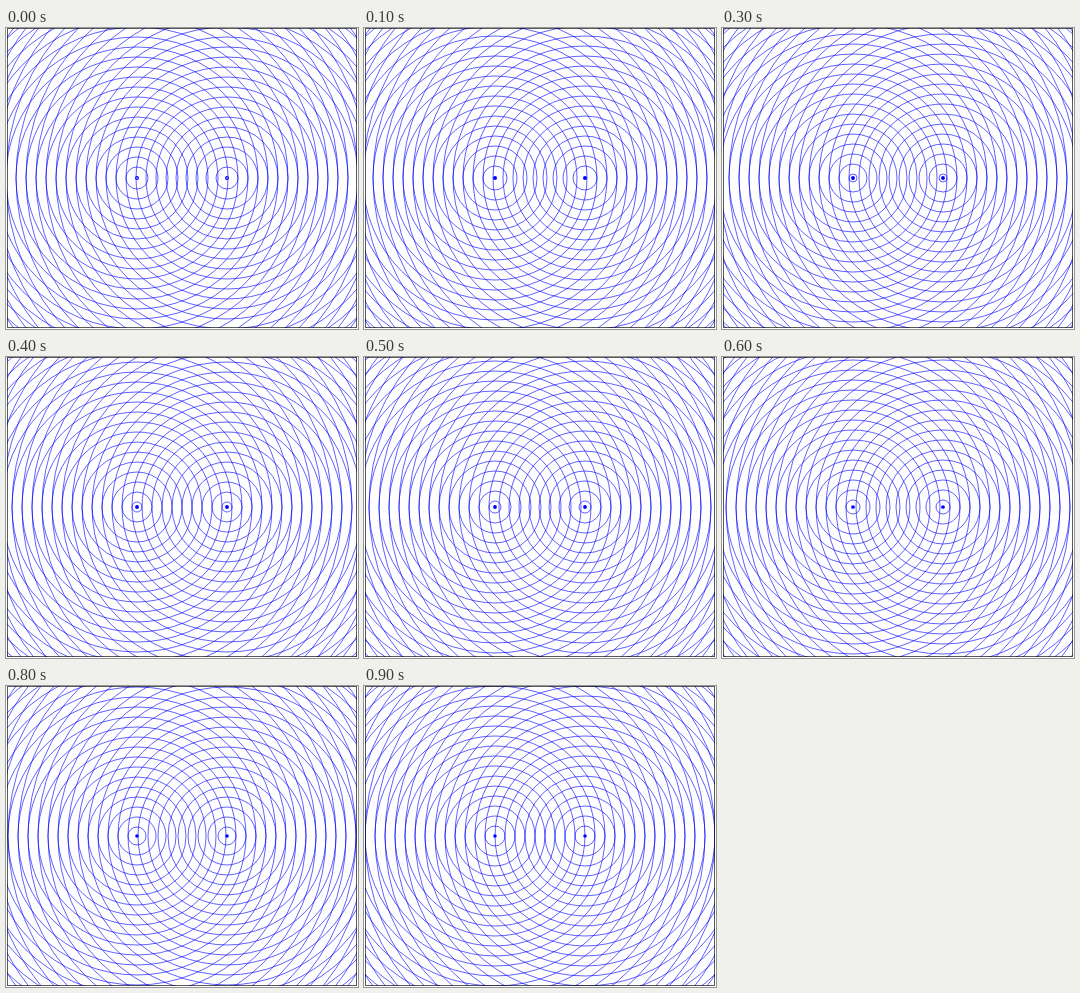
Write an HTML page that moves like this. It is 352x301 px and loops after 1 s.

```html
<!DOCTYPE html>
<html lang="en">
<head>
<meta charset="utf-8">
<title>Wave interference</title>
<style>
  html, body { margin: 0; width: 100%; height: 100%; overflow: hidden; background: #fff; }
  svg { display: block; width: 352px; height: 301px; }
</style>
</head>
<body>
<svg viewBox="0 0 352 301" fill="none">
  <clipPath id="stage"><rect x="1" width="350" height="300"/></clipPath>
  <g id="waves" clip-path="url(#stage)" stroke="#00f" stroke-width="1" stroke-opacity=".62"></g>
  <g id="dots" stroke="#00f"></g>
  <rect x="1.5" y=".5" width="349" height="299" stroke="#000" stroke-opacity=".65"/>
</svg>
<script>
const LOOP = 1000, STEPS = 10, SPACING = 10, RINGS = 28;
const centers = [131, 221], centerY = 150;

function addCircle(parent, x) {
  const circle = document.createElementNS('http://www.w3.org/2000/svg', 'circle');
  circle.setAttribute('cx', x);
  circle.setAttribute('cy', centerY);
  return document.getElementById(parent).appendChild(circle);
}

const waves = centers.flatMap(x =>
  Array.from({ length: RINGS }, (_, i) => ({ node: addCircle('waves', x), base: i * SPACING })));
const dots = centers.map(x => addCircle('dots', x));

function draw(time) {
  const step = Math.floor((time % LOOP) / LOOP * STEPS);
  for (const { node, base } of waves) {
    const radius = base + step + 1;
    // a newborn ring is hidden by its dot
    node.setAttribute('r', radius < 3 ? 0 : radius);
  }
  // each dot opens as a ring at birth, then shrinks slightly
  for (const dot of dots) {
    dot.setAttribute('r', step ? 1.1 - step * 0.03 : 1.4);
    dot.setAttribute('stroke-width', step ? 1.9 : 1.1);
    dot.setAttribute('fill', step ? '#00f' : '#bbf');
  }
}

const start = performance.now();
function tick() {
  draw(performance.now() - start);
  requestAnimationFrame(tick);
}
draw(0);
tick();
</script>
</body>
</html>
```
